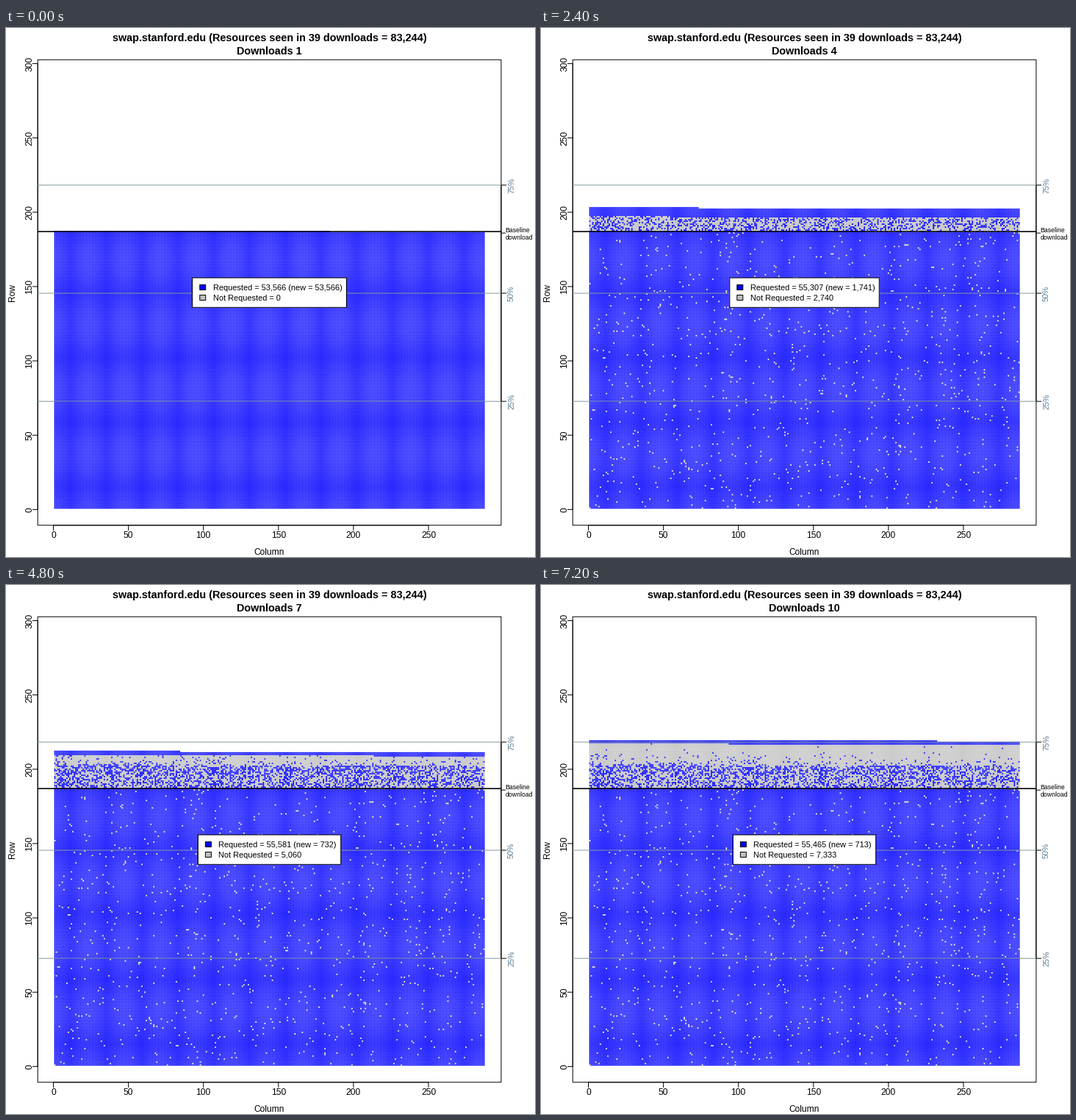
Recreate the animation shown at these times as a matplotlib script. Size 720 px wide and 720 px high, loop 8 s.

```python
import matplotlib.pyplot as plt
import numpy as np
from matplotlib.animation import FuncAnimation
from matplotlib.patches import Rectangle

SIZE = 720
LEFT, RIGHT, TOP, BOTTOM = 43.2, 673.92, 43.2, 676.8
COLS, ROWS = 287, 291
MID = (LEFT + RIGHT) / 2
DX = (RIGHT - LEFT) / (1.08 * (COLS - 1))
DY = (BOTTOM - TOP) / (1.08 * (ROWS - 1))

BLUE, GREY = (0, 0, 1), (190 / 255,) * 3
LINE, LABEL = "#839a9f", "#5b7d96"

# Per download: resources seen for the first time, and known ones not requested
NEW = [53566, 1354, 1386, 1741, 902, 960, 732, 718, 726, 713]
MISSING = [0, 988, 1936, 2740, 3420, 4090, 5060, 6025, 6680, 7333]
# Share of each later batch that keeps being requested
KEPT = [0.40, 0.42, 0.50, 0.14, 0.06, 0.01, 0.005, 0.005, 0.005]
TOTAL = np.cumsum(NEW)
BASE = NEW[0]


def px(col):
    return LEFT + 0.04 * (RIGHT - LEFT) / 1.08 + (col - 1) * DX


def py(row):
    return BOTTOM - 0.04 * (BOTTOM - TOP) / 1.08 - (row - 1) * DY


plt.rcParams["font.family"] = "Liberation Sans"
fig = plt.figure(figsize=(SIZE / 72, SIZE / 72), dpi=72, facecolor="white")
ax = fig.add_axes([0, 0, 1, 1])
ax.set_xlim(0, SIZE)
ax.set_ylim(SIZE, 0)
ax.axis("off")


def line(x0, y0, x1, y1, color="black", width=1, z=3):
    ax.plot([x0, x1], [y0, y1], color=color, lw=width, zorder=z,
            solid_capstyle="butt", snap=False)


def box(x, y, w, h, fill="none", z=3):
    patch = Rectangle((x, y), w, h, facecolor=fill, edgecolor="black",
                      lw=1, zorder=z, snap=False)
    return ax.add_patch(patch)


def label(x, y, s, size=12, ha="center", **kw):
    return ax.text(x, y, s, fontsize=size, ha=ha, va="baseline",
                   rotation_mode="anchor", zorder=6, **kw)


# Frame and axes
box(LEFT, TOP, RIGHT - LEFT, BOTTOM - TOP)

line(px(0), BOTTOM, px(250), BOTTOM)
for col in range(0, 251, 50):
    line(px(col), BOTTOM, px(col), BOTTOM + 7.2)
    label(px(col), 694, str(col))
label(MID, 717, "Column")

line(LEFT, py(0), LEFT, py(300))
for row in range(0, 301, 50):
    line(LEFT - 7.2, py(row), LEFT, py(row))
    label(35, py(row), str(row), rotation=90)
label(12, 360, "Row", rotation=90)

line(RIGHT, py(ROWS / 4), RIGHT, py(ROWS * 3 / 4))
for pct in (25, 50, 75):
    y = py(ROWS * pct / 100)
    line(LEFT, y, RIGHT, y, LINE)
    line(RIGHT, y, RIGHT + 7.2, y)
    label(691, y, f"{pct}%", 10.8, rotation=90, color=LABEL)

# Baseline marker
line(LEFT, py(187), RIGHT, py(187), width=1.6, z=4)
line(RIGHT, py(186), RIGHT + 6, py(186))
label(679.5, 278, "Baseline", 8.8, "left")
label(679.5, 288, "download", 8.8, "left")

# Titles
label(MID, 18, "swap.stanford.edu (Resources seen in 39 downloads = 83,244)",
      14.4, weight="bold")
title = label(MID, 36, "", 14.4, weight="bold")

# Legend
panel = box(0, 340, 0, 40.3, "white", 5)
keys = [box(0, 349.5, 8, 7, BLUE, 6), box(0, 363.5, 8, 7, GREY, 6)]
notes = [label(0, 357, "", 10.95, "left"), label(0, 371, "", 10.95, "left")]

# One dot per resource, filled row by row from the bottom
ids = np.arange(TOTAL[-1])
points = np.column_stack([px(ids % COLS + 1), py(ids // COLS + 1)])
rng = np.random.default_rng(39)
base_gaps = rng.choice(BASE, MISSING[1], replace=False)
rank = rng.random(TOTAL[-1] - BASE) / np.repeat(KEPT, NEW[1:])
dots = ax.scatter([], [], s=2.1 ** 2, marker="o", linewidths=0, zorder=2)


def dot_colors(i):
    colors = np.tile(BLUE, (TOTAL[i], 1)).astype(float)
    if i:
        colors[base_gaps] = GREY
        gaps = MISSING[i] - MISSING[1]
        old = TOTAL[i - 1] - BASE
        order = np.argsort(rank[:old])
        colors[BASE + order[old - gaps:]] = GREY
    return colors


def update(i):
    dots.set_offsets(points[:TOTAL[i]])
    dots.set_facecolors(dot_colors(i))
    title.set_text(f"Downloads {i + 1}")

    new = f"{NEW[i]:,}"
    commas = new.count(",")
    text_w = 10.95 * (12.952 + 0.556 * (len(new) - commas) + 0.278 * commas)
    width = text_w + 34.3
    x = MID - width / 2
    panel.set_x(x)
    panel.set_width(width)
    for key, note in zip(keys, notes):
        key.set_x(x + 10)
        note.set_x(x + 28)
    notes[0].set_text(f"Requested = {TOTAL[i] - MISSING[i]:,} (new = {new})")
    notes[1].set_text(f"Not Requested = {MISSING[i]:,}")
    return dots, title, panel, *keys, *notes


anim = FuncAnimation(fig, update, frames=len(NEW), interval=800,
                     repeat=True, repeat_delay=0, blit=False)
plt.show()
```
